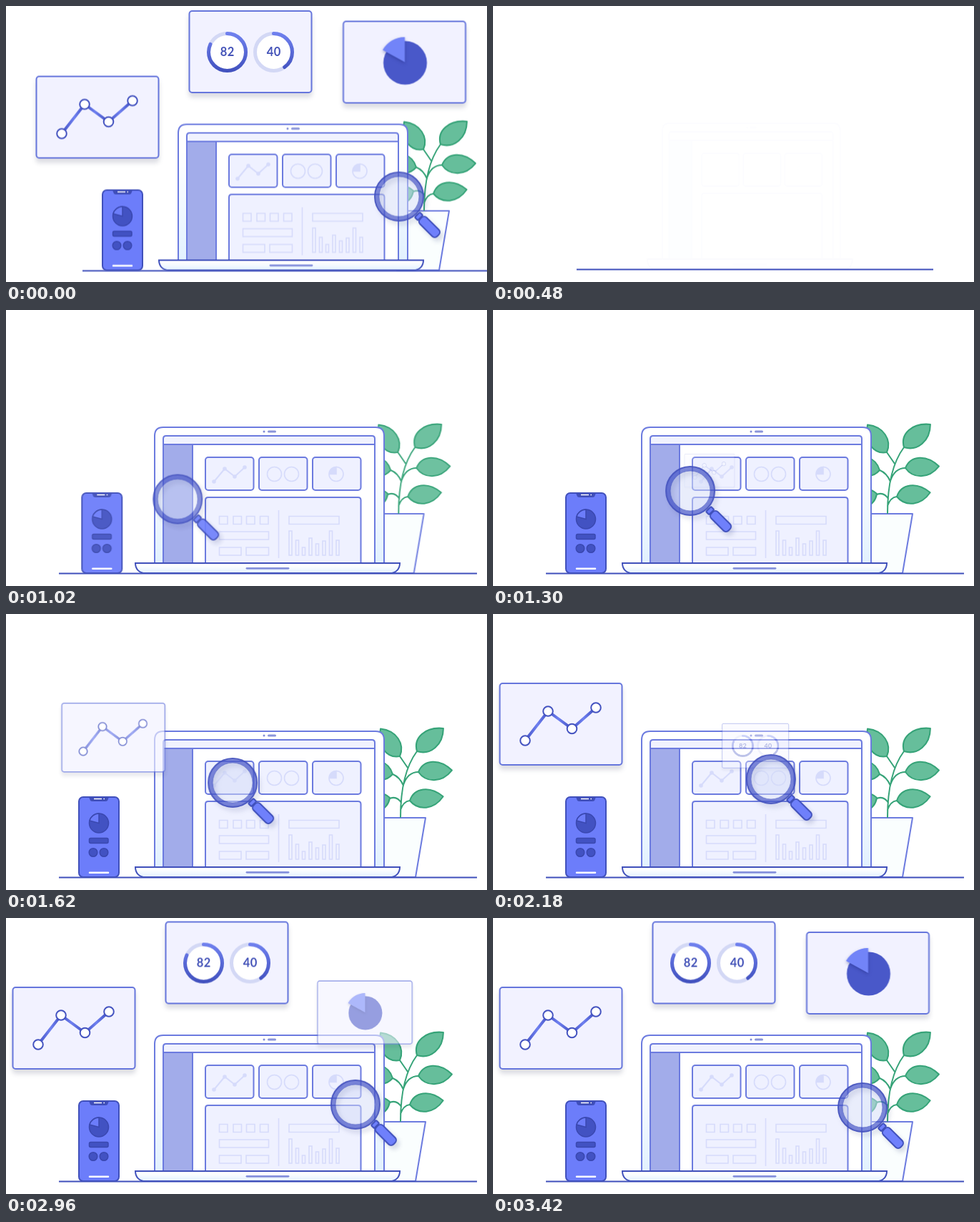
These frames come from a looping animation (673x386 px, 3.44 s). An HTML page:

```html
<!DOCTYPE html>
<html lang="en">
<head>
<meta charset="utf-8">
<title>Dashboard cards</title>
<style>
html, body { margin: 0; width: 100%; height: 100%; overflow: hidden; background: #fff; }
svg { display: block; width: 100vw; height: 100vh; }

.anim { animation: 3.44s ease-in-out infinite; }
.scene { animation-name: shot; animation-timing-function: linear; }
.ground { animation-name: ground; transform-origin: 366px 0; }
.laptop { animation-name: laptop; transform-origin: 336.5px 0; }
.phone { --from: 78px; animation-name: slide; }
.pot { --from: -43px; animation-name: slide; }
.plant { --from: -50px; animation-name: slide; }
.card { animation-timing-function: ease-in-out, linear; filter: drop-shadow(0 6px 3px rgba(40, 45, 80, .16)); }
.c1 { --x: 218px; --y: 74px; animation-name: move1, show1; }
.c2 { --x: 79px; --y: 165.5px; animation-name: move2, show2; }
.c3 { --x: -61.5px; --y: 151px; animation-name: move3, show3; }
.magX { animation-name: magX; animation-timing-function: linear; }
.magY { animation-name: magY; }
.mag { animation-name: fade; }
.shade { filter: drop-shadow(4px 5px 3px rgba(50, 60, 120, .18)); }

/* The finished picture shows for the first 20 ms, then the build-up starts. */
@keyframes shot {
  0%, .58% { transform: translate(33px, 1.5px); }
  .581%, 100% { transform: none; }
}
@keyframes ground {
  0%, .58%, 18%, 100% { transform: none; }
  .581%, 2.9% { transform: scaleX(0); }
}
@keyframes laptop {
  0%, .58%, 26.45%, 100% { opacity: 1; transform: none; }
  .581%, 12.5% { opacity: 0; transform: scaleX(.77); }
}
@keyframes slide {
  0%, .58%, 31.98%, 100% { opacity: 1; transform: none; }
  .581%, 18.02% { opacity: 0; transform: translateX(var(--from)); }
}
@keyframes move1 {
  0%, .58%, 53.6%, 100% { transform: none; }
  .581%, 35% { transform: translate(var(--x), var(--y)) scale(.38); }
}
@keyframes show1 {
  0%, .58%, 53.6%, 100% { opacity: 1; }
  .581%, 35% { opacity: 0; }
}
@keyframes move2 {
  0%, .58%, 75%, 100% { transform: none; }
  .581%, 56.98% { transform: translate(var(--x), var(--y)) scale(.38); }
}
@keyframes show2 {
  0%, .58%, 75%, 100% { opacity: 1; }
  .581%, 56.98% { opacity: 0; }
}
@keyframes move3 {
  0%, .58%, 93.9%, 100% { transform: none; }
  .581%, 75.29% { transform: translate(var(--x), var(--y)) scale(.38); }
}
@keyframes show3 {
  0%, .58%, 93.9%, 100% { opacity: 1; }
  .581%, 75.29% { opacity: 0; }
}
@keyframes fade {
  0%, .58%, 32%, 100% { opacity: 1; }
  .581%, 20.35% { opacity: 0; }
}
@keyframes magX {
  0%, .58%, 92.44%, 100% { transform: translateX(517px); }
  .581%, 19.77% { transform: translateX(196.5px); }
}
@keyframes magY {
  0%, .58% { transform: translateY(265px); }
  .581%, 19.77% { transform: translateY(274.5px); animation-timing-function: linear; }
  22.67% { transform: translateY(272px); animation-timing-function: cubic-bezier(.333, .23, .667, .59); }
  37.79% { transform: translateY(253px); animation-timing-function: cubic-bezier(.333, .3, .667, .78); }
  47.09% { transform: translateY(236px); animation-timing-function: cubic-bezier(.333, 1.31, .667, 1.82); }
  63.37% { transform: translateY(231px); animation-timing-function: cubic-bezier(.333, .17, .667, .69); }
  75% { transform: translateY(248px); animation-timing-function: cubic-bezier(.333, .47, .667, .86); }
  92.44%, 100% { transform: translateY(265px); }
}

.line { fill: none; stroke: #6c7bdf; stroke-width: 2; }
.dark { stroke: #4050bb; stroke-width: 2; }
.ghost { fill: none; stroke: #d6dbfb; stroke-width: 1.6; }
.tile { fill: #eff1ff; stroke: #6c7bdf; stroke-width: 2; }
.leaf { fill: #66be9b; }
.plant { fill: none; stroke: #36a378; stroke-width: 2; stroke-linecap: round; stroke-linejoin: round; }
.board { fill: #f2f2ff; stroke: #6676dc; stroke-width: 2; }
.dot { fill: #fff; stroke: #4453c0; stroke-width: 2; }
.icon { fill: #4252c2; stroke: #3a48b0; stroke-width: 1.5; }
text { font: 700 16.5px Lato, sans-serif; letter-spacing: .5px; fill: #4453b8; text-anchor: middle; }
</style>
</head>
<body>
<svg viewBox="0 0 673 386" preserveAspectRatio="none">
  <defs>
    <linearGradient id="shell" x2="0" y2="1">
      <stop offset=".2" stop-color="#fff"/><stop offset="1" stop-color="#e2f1ff"/>
    </linearGradient>
    <linearGradient id="arc" x2="0" y2="1">
      <stop offset="0" stop-color="#6f80ee"/><stop offset="1" stop-color="#4252bf"/>
    </linearGradient>
    <linearGradient id="trend" gradientUnits="userSpaceOnUse" x1="-50" x2="-18" spreadMethod="reflect">
      <stop offset="0" stop-color="#4453c5"/><stop offset=".55" stop-color="#6f80f0"/><stop offset="1" stop-color="#4453c5"/>
    </linearGradient>
    <path id="leaf" d="M0 0C8-17 30-18 47 0C32 17 10 16 0 0Z"/>
    <rect id="board" class="board" x="-85.5" y="-57" width="171" height="114" rx="4"/>
  </defs>

  <g class="anim scene">
    <path class="anim pot" d="M500 285H587L573 368H514Z" fill="#fafefe" stroke="#6c7bdf" stroke-width="2" stroke-linejoin="round"/>
    <g class="anim plant">
      <path d="M552 284C552 250 558 215 575 192M562 215L551 199M556 239C560 227 567 221 577 221M556 240Q551 228 541 224M552 274Q556 262 565 261M553 264Q547 254 537 258"/>
      <g class="leaf">
        <use href="#leaf" transform="translate(575 192) rotate(-41) scale(1.04)"/>
        <use href="#leaf" transform="translate(551 199) rotate(-125)"/>
        <use href="#leaf" transform="translate(577 221) rotate(-3)"/>
        <use href="#leaf" transform="translate(565 261) rotate(-7)"/>
        <use href="#leaf" transform="translate(541 224) rotate(-164)"/>
        <use href="#leaf" transform="translate(537 257) rotate(164)"/>
      </g>
    </g>

    <g class="anim phone">
      <rect class="dark" x="102" y="256" width="56" height="112" rx="6" fill="#6c7dfa"/>
      <path d="M116 256H144L142 261Q141 262 139 262H121Q119 262 118 261Z" fill="#3f4eb9"/>
      <path d="M123 258.5H134M136.5 258.5H138" stroke="#fff" stroke-width="1.5"/>
      <circle class="icon" cx="130" cy="292.5" r="13.5"/>
      <path d="M130 292.5V279A13.5 13.5 0 0 0 117 289Z" fill="#6c7dfa" stroke="#3a48b0" stroke-width="1.5"/>
      <rect class="icon" x="116.5" y="313.5" width="26.5" height="7" rx="2"/>
      <circle class="icon" cx="122" cy="333.5" r="5.8"/>
      <circle class="icon" cx="137" cy="333.5" r="5.8"/>
      <path d="M117 361.8H143" stroke="#fff" stroke-width="2.5" stroke-linecap="round"/>
    </g>

    <path class="anim ground dark" d="M74 368.5H659"/>

    <g class="anim laptop">
      <path class="line" d="M208 354V176Q208 164 220 164H517Q529 164 529 176V354Z" style="fill:url(#shell)"/>
      <path d="M220 354V180Q220 176 224 176H512Q516 176 516 180V354Z" fill="#fff"/>
      <path d="M220 188V180Q220 176 224 176H512Q516 176 516 180V188Z" fill="#f0f2fe"/>
      <path d="M220 188H261V354H220Z" fill="#a2acea"/>
      <path class="line" d="M220 354V180Q220 176 224 176H512Q516 176 516 180V354M220 188H516M261 188V354"/>
      <circle cx="361" cy="170" r="1.5" fill="#7f8ad8"/>
      <path d="M367.5 170H376.5" stroke="#8a94da" stroke-width="3" stroke-linecap="round"/>

      <rect class="tile" x="279" y="206" width="67.5" height="46" rx="4"/>
      <rect class="tile" x="354" y="206" width="67.5" height="46" rx="4"/>
      <rect class="tile" x="429" y="206" width="67.5" height="46" rx="4"/>
      <path class="tile" d="M279 354V266Q279 262 283 262H492.5Q496.5 262 496.5 266V354"/>

      <g class="ghost">
        <path d="M291 240L306 222L320 233L334 220" stroke-width="2"/>
        <g fill="#d6dbfb">
          <circle cx="291" cy="240" r="2"/><circle cx="306" cy="222" r="2"/>
          <circle cx="320" cy="233" r="2"/><circle cx="334" cy="220" r="2"/>
        </g>
        <circle cx="375.5" cy="229.5" r="10"/>
        <circle cx="399.5" cy="229.5" r="10"/>
        <circle cx="462" cy="229.5" r="10"/>
        <path d="M462 229.5V219.5A10 10 0 0 0 452.5 229.5Z" fill="#d6dbfb"/>
        <path d="M298.5 288.5h11.5v11h-11.5zM318 288.5h11.5v11h-11.5zM336.5 288.5h11.5v11h-11.5zM355.5 288.5h11.5v11h-11.5z"/>
        <path d="M298.5 310h69v11h-69zM298.5 332h30.5v11h-30.5zM336 332h31.5v11h-31.5zM396 288.5h70v11h-70zM381.5 280V347"/>
        <path d="M396 343v-34h4v34zM405.5 343v-21h4v21zM414.5 343v-11h4v11zM424 343v-24h4v24zM433.5 343v-16h4v16zM443 343v-20h4v20zM452.5 343v-34h4v34zM462 343v-21h4v21z"/>
      </g>

      <path class="dark" d="M181 354H551C551 363 545 368 537 368H195C187 368 181 363 181 354Z" fill="url(#shell)"/>
      <path d="M337 361.3H395" stroke="#8591dc" stroke-width="2.8" stroke-linecap="round"/>
    </g>

    <g transform="translate(95 154)"><g class="anim card c1">
      <use href="#board"/>
      <path d="M-50 23L-18 -18L15.5 6.5L49 -23" fill="none" stroke="url(#trend)" stroke-width="4"/>
      <g class="dot">
        <circle cx="-50" cy="23" r="6.8"/><circle cx="-18" cy="-18" r="6.8"/>
        <circle cx="15.5" cy="6.5" r="6.8"/><circle cx="49" cy="-23" r="6.8"/>
      </g>
    </g></g>

    <g transform="translate(309 62.5)"><g class="anim card c2">
      <use href="#board"/>
      <g fill="#fff" stroke="#d3d8f5" stroke-width="5">
        <circle cx="-32.5" cy=".5" r="26"/><circle cx="32.5" cy=".5" r="26"/>
      </g>
      <g fill="none" stroke="url(#arc)" stroke-width="5" stroke-linecap="round">
        <path pathLength="100" stroke-dasharray="82 100" d="M-32.5 -25.5a26 26 0 0 1 0 52a26 26 0 0 1 0 -52"/>
        <path pathLength="100" stroke-dasharray="40 100" d="M32.5 -25.5a26 26 0 0 1 0 52a26 26 0 0 1 0 -52"/>
      </g>
      <text x="-32.3" y="6">82</text>
      <text x="32.7" y="6">40</text>
    </g></g>

    <g transform="translate(524.5 77)"><g class="anim card c3">
      <use href="#board"/>
      <circle cx="1" cy="1" r="30.5" fill="#4958c9"/>
      <path d="M.5 0V-35A35 35 0 0 0 -30.5 -17Z" fill="#7284f8" style="filter:drop-shadow(0 2px 2px rgba(30,40,120,.4))"/>
    </g></g>

    <g class="anim magX"><g class="anim magY"><g class="anim mag">
      <circle r="28" fill="#d3dcf8" fill-opacity=".5"/>
      <g class="shade">
        <circle r="31.3" fill="none" stroke="#4b5bcb" stroke-width="6.5" opacity=".72"/>
        <circle r="34" fill="none" stroke="#4352bd" stroke-width="2" opacity=".85"/>
        <circle r="28" fill="none" stroke="#4352bd" opacity=".55"/>
        <g class="dark" fill="#6f80fb" transform="rotate(45)">
          <rect x="36" y="-5" width="6" height="10" rx="1"/>
          <rect x="43" y="-6.5" width="34" height="13" rx="5"/>
        </g>
      </g>
    </g></g></g>
  </g>
</svg>
</body>
</html>
```
